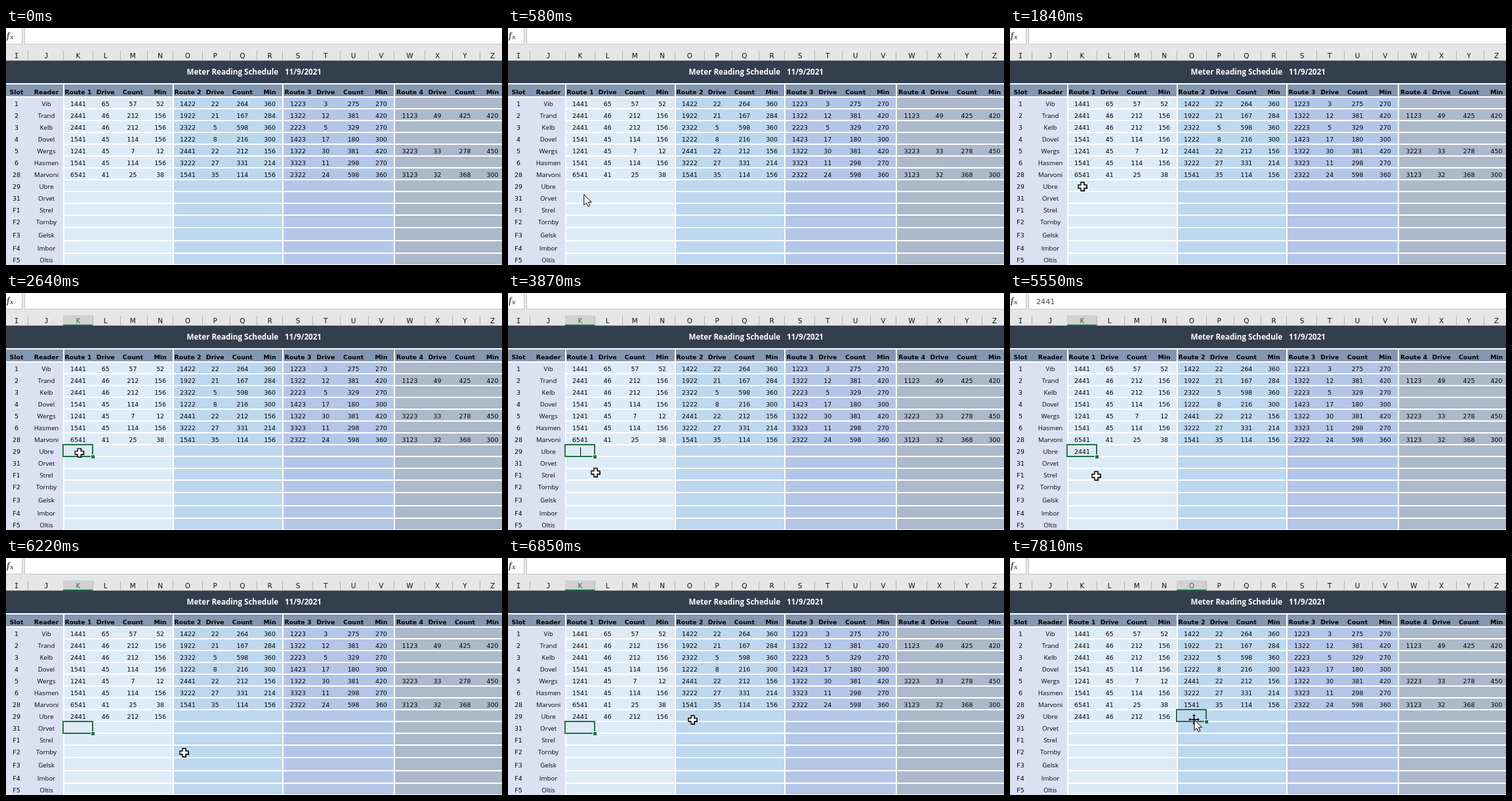
Recreate the animation shown at these times as an HTML page. Size 756x361 px, loop 8000 ms.

```html
<!DOCTYPE html>
<html lang="en">
<head>
<meta charset="utf-8">
<title>Meter Reading Schedule</title>
<style>
html, body { margin: 0; width: 100%; height: 100%; overflow: hidden; background: #fff; }
svg { display: block; width: 756px; height: 361px; font-family: "DejaVu Sans", sans-serif; }
.mid { text-anchor: middle; }
.cell { font-size: 9.4px; fill: #000; }
.name { font: 9.7px "Open Sans", sans-serif; fill: #000; }
.bold { font-weight: bold; font-size: 9.4px; fill: #000; }
.letter { font-size: 10.5px; fill: #111; }
.mono { font-family: "DejaVu Sans Mono", monospace; }
.title { font: bold 11.6px "Open Sans", sans-serif; fill: #fff; }
.formula { font-size: 11.2px; fill: #444; }
.fx { font: italic bold 14px "Liberation Serif", serif; fill: #555; }
</style>
</head>
<body>
<svg id="stage" viewBox="0 0 756 361" width="756" height="361"></svg>
<script>
const NS = "http://www.w3.org/2000/svg";
const stage = document.getElementById("stage");
const LOOP = 8000;
const GREEN = "#217346";

function add(tag, attrs, parent = stage) {
  const el = document.createElementNS(NS, tag);
  for (const k in attrs) el.setAttribute(k, attrs[k]);
  parent.appendChild(el);
  return el;
}
const box = (x, y, width, height, fill, parent) => add("rect", { x, y, width, height, fill }, parent);
function label(x, y, text, cls, parent) {
  const el = add("text", { x, y, class: cls }, parent);
  el.textContent = text;
  return el;
}
const show = (el, on) => el.setAttribute("visibility", on ? "visible" : "hidden");
const move = (el, [x, y]) => el.setAttribute("transform", `translate(${x.toFixed(2)} ${y.toFixed(2)})`);

// Four routes of four columns each, after the Slot and Reader columns
const routes = [
  { x: 87, fill: "#ddebf7", first: 23, step: 41.7 },
  { x: 254, fill: "#bdd7ee", first: 23, step: 41.7 },
  { x: 421, fill: "#b4c6e7", first: 24, step: 42.3 },
  { x: 591, fill: "#acb9ca", first: 24.5, step: 42 }
];
const centers = [16, 61.5];
for (const { x, first, step } of routes)
  for (let i = 0; i < 4; i++) centers.push(x + first + step * i);

// Rows are 18 high; two late ones are 2 taller
const rowMid = r => 115 + 18 * r + 2 * Math.max(0, Math.min(2, r - 10));
const rowTop = r => Math.floor((rowMid(r - 1) + rowMid(r)) / 2) - 1;
const baseline = r => rowMid(r) + 4;

const schedule = `
1 Vib 1441 65 57 52 1422 22 264 360 1223 3 275 270
2 Trand 2441 46 212 156 1922 21 167 284 1322 12 381 420 1123 49 425 420
3 Kelb 2441 46 212 156 2322 5 598 360 2223 5 329 270
4 Dovel 1541 45 114 156 1222 8 216 300 1423 17 180 300
5 Wergs 1241 45 7 12 2441 22 212 156 1322 30 381 420 3223 33 278 450
6 Hasmen 1541 45 114 156 3222 27 331 214 3323 11 298 270
28 Marvoni 6541 41 25 38 1541 35 114 156 2322 24 598 360 3123 32 368 300
29 Ubre
31 Orvet
F1 Strel
F2 Tornby
F3 Gelsk
F4 Imbor
F5 Oltis`;
const rows = schedule.trim().split("\n").map(line => line.split(" "));

// Formula bar
box(0, 0, 756, 50, "#e6e6e6");
for (const [x, w] of [[0, 24], [28, 728]]) {
  box(x, 0, w, 24, "#fff");
  box(x, 24, w, 1, "#c6c6c6");
}
box(24, 0, 1, 25, "#c6c6c6");
box(28, 0, 1, 25, "#c6c6c6");
label(1, 16, "f", "fx");
label(6, 17, "x", "fx").style.fontSize = "11px";
const formula = label(40, 17, "", "formula");

// Column letters
const tick = x => box(Math.round(x), 35, 1, 14, "#b0b0b0");
tick(33);
for (const { x, first, step } of routes) {
  tick(x);
  for (let i = 0; i < 3; i++) tick(x + first + step * (i + 0.5) + 1);
}
box(0, 49, 756, 1, "#a6a6a6");
const headMark = add("g", {});
box(0, 34, 45, 15, "#d2d2d2", headMark);
box(0, 48, 45, 2, GREEN, headMark);
const letters = [..."IJKLMNOPQRSTUVWXYZ"].map((c, i) =>
  label(centers[i], 46, c, "mid letter" + (i < 2 ? " mono" : "")));

// Title and table
box(0, 50, 756, 34, "#333f4f");
label(275.5, 71, "Meter Reading Schedule", "title");
label(425, 71, "11/9/2021", "title");
box(0, 84, 756, 277, "#fff");
box(0, 86, 756, 18, "#8497b0");
box(0, 106, 87, 255, "#d9e1f2");
for (const { x, fill } of routes) box(x, 106, 756 - x, 255, fill);
for (let r = 1; r <= rows.length; r++) box(87, rowTop(r) - 1, 669, 2, "#fff");
for (const { x } of routes) box(x, 84, 2, 277, "#fff");

label(centers[0], 101, "Slot", "mid bold");
label(centers[1], 101, "Reader", "mid bold");
routes.forEach((_, r) => ["Route " + (r + 1), "Drive", "Count", "Min"].forEach((s, i) =>
  label(centers[2 + r * 4 + i], 101, s, "mid bold")));
rows.forEach((cells, r) => cells.forEach((s, i) =>
  label(centers[i], baseline(r), s, i === 1 ? "mid name" : "mid cell")));

// Live cells, in the row of slot 29
const LIVE = 7;
const entry = label(centers[2], baseline(LIVE), "", "mid cell");
const filled = add("g", {});
["46", "212", "156"].forEach((s, i) => label(centers[3 + i], baseline(LIVE), s, "mid cell", filled));
const caret = box(0, 235, 1, 13, "#000");

const select = add("g", {});
add("rect", { width: 45, height: 18, fill: "none", stroke: GREEN, "stroke-width": 2 }, select);
box(42, 15, 6, 6, "#fff", select);
box(43, 16, 5, 5, GREEN, select);

// Pointers, each with its hotspot at 0,0
const ARROW = "M.5 .5V16.5L4.2 13L6.8 18.6L9.4 17.4L6.9 12H12Z";
const PLUS = "M-2.5 -6.5H2.5V-2.5H6.5V2.5H2.5V6.5H-2.5V2.5H-6.5V-2.5H-2.5Z";
const arrow = add("path", { d: ARROW, fill: "#fff", stroke: "#000" });
const cross = add("g", {});
add("path", { d: PLUS, fill: "#000", transform: "translate(1 1)" }, cross);
add("path", { d: PLUS, fill: "#fff", stroke: "#000", "stroke-width": 1.4 }, cross);
const mover = add("g", {});
for (let a = 0; a < 360; a += 90)
  add("path", { d: "M-.7 0V-5H-3.2L0 -8.8L3.2 -5H.7V0Z", stroke: "#fff", "stroke-width": .6, transform: `rotate(${a})` }, mover);
add("path", { d: "M-5 0H5M0 -5V5", stroke: "#000", "stroke-width": 1.5 }, mover);
add("path", { d: ARROW, fill: "#fff", stroke: "#000" }, mover);

// Motion: a starting point, then moves of [from, to, x, y]
const easeOut = p => 1 - (1 - p) ** 2.5;
const smooth = p => p * p * (3 - 2 * p);
function along([x, y], moves, ease, t) {
  for (const [from, to, nx, ny] of moves) {
    const p = ease(Math.max(0, Math.min(1, (t - from) / (to - from))));
    x += (nx - x) * p;
    y += (ny - y) * p;
  }
  return [x, y];
}

const k29 = [routes[0].x, rowTop(LIVE)];
const k31 = [routes[0].x, rowTop(LIVE + 1)];
const o29 = [routes[1].x, rowTop(LIVE)];
const selectMoves = [[2200, 2310, ...k29], [5950, 6050, ...k31], [7030, 7150, ...o29]];
const arrowMoves = [[130, 680, 108, 252], [880, 1130, 102, 244]];
const crossMoves = [
  [1390, 1840, 110.5, 241.5], [2590, 2940, 133.5, 273.5], [3870, 3950, 132, 277],
  [5040, 5060, 131.5, 278.5], [5950, 6220, 271.5, 296.5], [6220, 6730, 282.5, 250.5],
  [6780, 6850, 281.5, 246.5]
];
const CODE = "2441", keyTimes = [3900, 4410, 4900, 5040];
const EDIT = 3870, ENTER = 5950, NEXT = 7030;

function draw(t) {
  show(arrow, t >= 130 && t < 1390);
  move(arrow, along([640, 345], arrowMoves, easeOut, t));
  show(cross, t >= 1390 && t < 7810);
  move(cross, along([97.5, 240], crossMoves, smooth, t));
  show(mover, t >= 7810);
  move(mover, [280.5, 246]);

  const active = t >= 2200, route = t < NEXT ? 0 : 1;
  show(select, active);
  move(select, along([735, 297], selectMoves, easeOut, t));
  show(headMark, active);
  move(headMark, [routes[route].x, 0]);
  letters.forEach((el, i) => { el.style.fill = active && i === 2 + route * 4 ? GREEN : ""; });

  const editing = t >= EDIT && t < ENTER;
  const count = keyTimes.filter(at => t >= at).length;
  entry.textContent = CODE.slice(0, count);
  formula.textContent = editing ? CODE.slice(0, count) : "";
  show(filled, t >= ENTER);
  // The caret stays solid after a key, then fades out
  const idle = t - (count ? keyTimes[count - 1] : EDIT);
  show(caret, editing);
  caret.setAttribute("x", 110 + count * 3);
  caret.setAttribute("opacity", Math.max(0, Math.min(1, (490 - idle) / 100)));
}

const start = performance.now();
function frame() {
  draw((performance.now() - start) % LOOP);
  requestAnimationFrame(frame);
}
draw(0);
requestAnimationFrame(frame);
</script>
</body>
</html>
```
